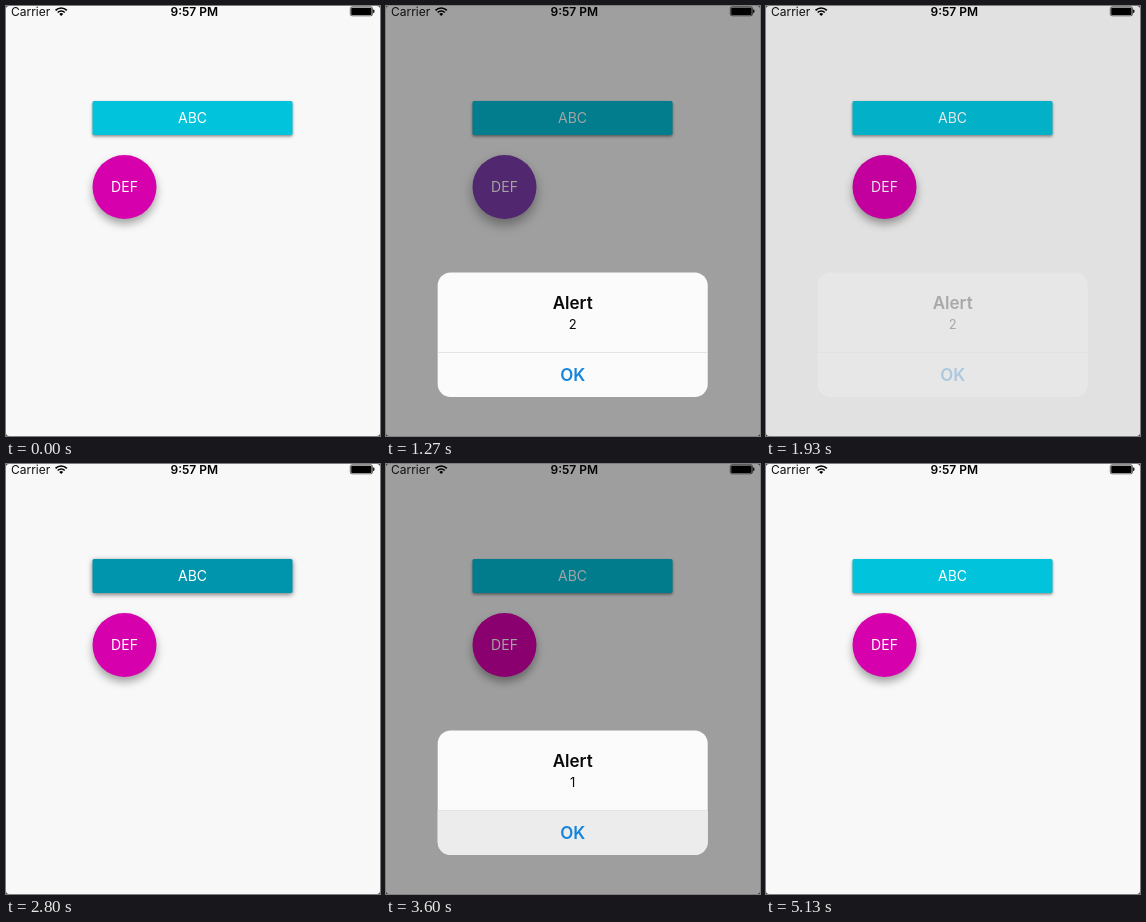
Animation of 374x430 px, one loop 5.19 s. Source, as an HTML page with a canvas:

```html
<!DOCTYPE html>
<html lang="en">
<head>
<meta charset="utf-8">
<title>Button alerts</title>
<style>
  html, body { margin: 0; width: 100%; height: 100%; overflow: hidden; background: #f8f8f8; }
  canvas { display: block; }
</style>
</head>
<body>
<canvas id="stage" width="374" height="430"></canvas>
<script>
const W = 374, H = 430, LOOP = 5190, STEP = 200 / 3;
const FONT = 'Inter, Roboto, sans-serif';
const PRESSED = [0, 149, 172];
const DIM = 0.363;

const ctx = document.getElementById('stage').getContext('2d');
const layer = document.createElement('canvas');
layer.width = W;
layer.height = H;
const panel = layer.getContext('2d');

const alerts = [
  { count: '2', show: 851, okDown: 1590, hide: 1817 },
  { count: '1', show: 2842, okDown: 3590, hide: 3910 }
];
const DEF_PRESS = 500, ABC_PRESS = 2500;

const clamp = x => Math.min(1, Math.max(0, x));
const ease = x => { x = clamp(x); return x * x * (3 - 2 * x); };
const mix = (a, b, k) => `rgb(${a.map((v, i) => Math.round(v + (b[i] - v) * k))})`;

// Remaining distance of a critically damped spring.
function springRest(t) {
  const x = 0.0228 * Math.max(0, t);
  return (1 + x) * Math.exp(-x);
}

function text(c, str, x, baseline, size, weight, color, align = 'center') {
  c.font = `${weight} ${size}px ${FONT}`;
  c.textAlign = align;
  c.textBaseline = 'alphabetic';
  c.fillStyle = color;
  c.fillText(str, x, baseline);
}

function roundRect(c, x, y, w, h, r) {
  c.beginPath();
  c.roundRect(x, y, w, h, r);
}

// Tint and lift of a button: quick in, slow out.
function pressState(t, start) {
  const release = 1 - ease((t - start - 430) / 600);
  return {
    tint: clamp((t - start) / 100) * release,
    lift: ease((t - start) / 350) * release
  };
}

function fillWithShadow(color, alpha, blur, offset) {
  ctx.save();
  ctx.shadowColor = `rgba(0,0,0,${alpha})`;
  ctx.shadowBlur = blur;
  ctx.shadowOffsetY = offset;
  ctx.fillStyle = color;
  ctx.fill();
  ctx.restore();
}

function drawButtons(t) {
  const abc = pressState(t, ABC_PRESS);
  roundRect(ctx, 86.5, 95, 200, 34, 1.5);
  fillWithShadow(mix([2, 195, 220], PRESSED, abc.tint), 0.45 + 0.1 * abc.lift, 3 + 3 * abc.lift, 1.5);
  text(ctx, 'ABC', 186.5, 117, 14, 400, '#fff');

  const def = pressState(t, DEF_PRESS);
  ctx.beginPath();
  ctx.arc(118.5, 181, 32, 0, Math.PI * 2);
  fillWithShadow(mix([215, 0, 173], PRESSED, def.tint), 0.35, 8 + 10 * def.lift, 5 + 2 * def.lift);
  text(ctx, 'DEF', 118.5, 186, 14, 400, '#fff');
}

function drawAlert(alert, t, alpha, scale) {
  panel.setTransform(1, 0, 0, 1, 0, 0);
  panel.clearRect(0, 0, W, H);
  panel.translate(186.7, 328.8);
  panel.scale(scale, scale);

  roundRect(panel, -135, -62.3, 270, 124.6, 13);
  panel.fillStyle = '#fbfbfb';
  panel.fill();
  if (t >= alert.okDown && t < alert.hide) {
    roundRect(panel, -135, 18, 270, 44.3, [0, 0, 13, 13]);
    panel.fillStyle = '#ececec';
    panel.fill();
  }
  panel.fillStyle = '#dfdfe1';
  panel.fillRect(-135, 17.3, 270, 0.8);

  text(panel, 'Alert', 0, -26, 17, 600, '#080808');
  text(panel, alert.count, 0, -6.2, 13, 400, '#080808');
  text(panel, 'OK', 0, 46.4, 17, 600, '#1484dc');

  ctx.globalAlpha = alpha;
  ctx.drawImage(layer, 0, 0);
  ctx.globalAlpha = 1;
}

function drawStatusBar() {
  text(ctx, 'Carrier', 5, 10, 12, 400, '#111', 'left');
  text(ctx, '9:57 PM', 188.3, 10, 12, 600, '#000');

  // Wi-Fi fan
  const up = -Math.PI / 2, spread = Math.PI / 4;
  ctx.strokeStyle = ctx.fillStyle = '#000';
  ctx.lineWidth = 1.6;
  for (const r of [8, 5]) {
    ctx.beginPath();
    ctx.arc(55.2, 10, r, up - spread, up + spread);
    ctx.stroke();
  }
  ctx.beginPath();
  ctx.moveTo(55.2, 10);
  ctx.arc(55.2, 10, 2.8, up - spread, up + spread);
  ctx.fill();

  // Battery
  ctx.lineWidth = 0.6;
  roundRect(ctx, 344.3, 0.8, 22.2, 9, 1.8);
  ctx.stroke();
  roundRect(ctx, 345.2, 1.7, 20.4, 7.2, 1);
  ctx.fill();
  roundRect(ctx, 367.1, 3.6, 1.3, 3.4, [0, 1, 1, 0]);
  ctx.fill();
}

function drawCorners() {
  ctx.beginPath();
  ctx.rect(0, 0, W, H);
  ctx.roundRect(0, 0, W, H, 3);
  ctx.fillStyle = '#333';
  ctx.fill('evenodd');
}

function draw(t) {
  ctx.fillStyle = '#f8f8f8';
  ctx.fillRect(0, 0, W, H);
  drawButtons(t);

  for (const alert of alerts) {
    const shown = 1 - springRest(t - alert.show);
    const alpha = shown * springRest(t - alert.hide);
    if (alpha < 0.004) continue;
    ctx.fillStyle = `rgba(0,0,0,${DIM * alpha})`;
    ctx.fillRect(0, 0, W, H);
    drawAlert(alert, t, alpha, 1.2 - 0.2 * shown);
  }
  drawStatusBar();
  drawCorners();
}

const origin = performance.now();
function tick() {
  const t = (performance.now() - origin) % LOOP;
  draw(Math.floor((t + 5) / STEP) * STEP); // screen refreshes 15 times a second
  requestAnimationFrame(tick);
}
tick();
</script>
</body>
</html>
```
